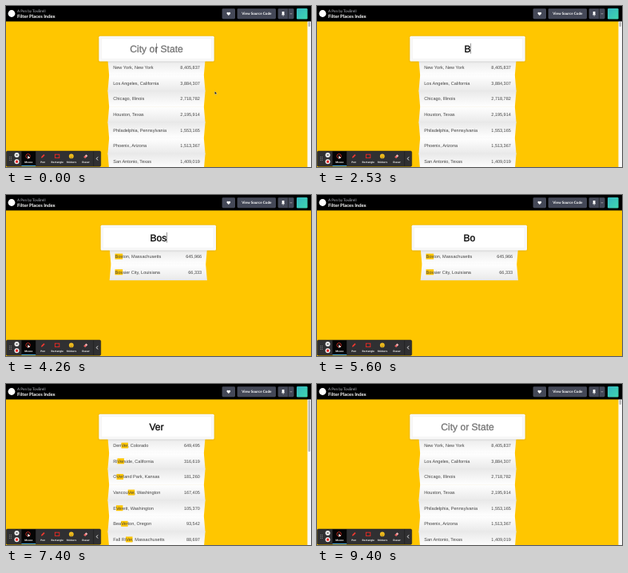
Recreate the animation shown at these times as an HTML page. Size 382 by 202 pixels, loop 9.46 s.

```html
<!DOCTYPE html>
<html lang="en">
<head>
<meta charset="utf-8">
<title>City search</title>
<style>
html, body { margin: 0; width: 100%; height: 100%; overflow: hidden; background: #ffc600; }
svg { display: block; width: 382px; height: 202px; }
text { font-family: "Liberation Sans", Arial, sans-serif; text-rendering: geometricPrecision; }
.head text { font-family: Lato, sans-serif; }
.rows text { font-size: 5.6px; fill: #444; }
.rows .num { font-size: 5.5px; text-anchor: end; }
.tools text { font: 700 3.1px Inter, sans-serif; fill: #eee; text-anchor: middle; }
#query { font-size: 12.08px; text-anchor: middle; stroke-width: .3px; }
</style>
</head>
<body>
<svg viewBox="0 0 382 202">
  <defs>
    <linearGradient id="odd" x1="0" y1="0" x2="0" y2="1">
      <stop offset="0" stop-color="#e9e9e9"/><stop offset="1" stop-color="#fff"/>
    </linearGradient>
    <linearGradient id="even" x1="0" y1="0" x2="0" y2="1">
      <stop offset="0" stop-color="#fff"/><stop offset="1" stop-color="#e9e9e9"/>
    </linearGradient>
    <linearGradient id="face" x1="0" y1="0" x2="1" y2="1">
      <stop offset="0" stop-color="#35b5c0"/><stop offset="1" stop-color="#3fd8b0"/>
    </linearGradient>
    <filter id="soft" x="-10%" y="-20%" width="120%" height="140%"><feGaussianBlur stdDeviation=".8"/></filter>
  </defs>

  <rect width="382" height="202" fill="#ffc600"/>
  <g id="bar">
    <rect x="377.5" y="19" width="4.5" height="183" fill="#fafafa"/>
    <rect id="thumb" x="378.5" y="20" width="2.6" height="6" rx="1.3" fill="#b9b9b9"/>
  </g>

  <g id="form">
    <g class="rows" id="rows"></g>
    <rect x="116.3" y="38" width="144.4" height="32" rx="1.5" opacity=".14" filter="url(#soft)"/>
    <rect x="116.3" y="37.8" width="144.4" height="31.7" rx="1.5" fill="#f8f8f8"/>
    <rect x="119.3" y="40.9" width="138.4" height="25.6" fill="#fff" stroke="#efefef" stroke-width=".5"/>
    <text id="query" x="188.5" y="57.5"></text>
    <rect id="caret" y="46.8" width=".5" height="13" fill="#333"/>
  </g>

  <g class="head">
    <rect width="382" height="19.4"/>
    <circle cx="7" cy="9.5" r="4.4" fill="#fff"/>
    <text x="14" y="7.5" font-size="4.7" fill="#b4b6be">A Pen by TovBrell</text>
    <text x="14" y="14.6" font-size="5.9" font-weight="700" fill="#fff">Filter Places Index</text>
    <g fill="#444857">
      <rect x="270.6" y="3.2" width="16.4" height="13" rx="1.4"/>
      <rect x="289.6" y="3.2" width="48.4" height="13" rx="1.4"/>
      <rect x="340.6" y="3.2" width="20" height="13" rx="1.4"/>
    </g>
    <path d="M353.4 3.2v13" stroke="#111" stroke-width=".6"/>
    <path d="M278.8 12l-2-2.1c-1.2-1.5.8-3.2 2-1.6 1.2-1.6 3.2.1 2 1.6z" fill="#fff"/>
    <text x="313.8" y="11.4" font-size="4.6" font-weight="700" text-anchor="middle" fill="#fff">View Source Code</text>
    <path d="M345.7 7h2.8v3.2l.8 1.1h-4.4l.8-1.1zM346.8 11h.6v2h-.6z" fill="#fff"/>
    <path d="M355.8 9l1.2 1.3 1.2-1.3" fill="none" stroke="#ccc" stroke-width=".6"/>
    <rect x="364" y="3" width="13.6" height="13.4" rx="1.2" fill="url(#face)"/>
  </g>

  <g class="tools">
    <rect x=".3" y="182" width="118.4" height="19.3" rx="1.6" fill="#303032" stroke="#1c1c1c" stroke-width=".5"/>
    <g id="grip" fill="#999"></g>
    <circle cx="13.5" cy="187" r="3" fill="#f2f2f2"/>
    <path d="M12.4 185.9l2.2 2.2m0-2.2l-2.2 2.2" stroke="#222" stroke-width=".7"/>
    <circle cx="13.5" cy="195.3" r="3" fill="#f2f2f2"/>
    <rect x="12" y="193.8" width="3" height="3" rx=".5" fill="#e02020"/>
    <rect x="19.4" y="182.3" width="17.8" height="18.7" fill="#050505"/>
    <rect x="19.4" y="200" width="17.8" height="1" fill="#4aa8dc"/>
    <circle cx="27.6" cy="188.3" r="2.7" fill="none" stroke="#e8382c" stroke-width=".8"/>
    <path d="M27.4 187.6v4.4l1.1-1 1.8.1z" fill="#fff"/>
    <path d="M43.9 190.8l.5-1.7 3-3 1.2 1.2-3 3z" fill="#f03a32"/>
    <rect x="61.4" y="186.2" width="5.4" height="4.4" fill="none" stroke="#f02a24" stroke-width=".9"/>
    <circle cx="81.8" cy="188.4" r="2.9" fill="#f8c420"/>
    <path d="M80.2 189a1.7 1.5 0 0 0 3.2 0M80.8 187.2v.6m2-.6v.6" fill="none" stroke="#5a3a00" stroke-width=".5"/>
    <path d="M97.4 189.4l3-3.2 1.9 1.8-3 3.1z" fill="#f3b6b8"/>
    <path d="M97.4 189.4l1.3-1.4 1.9 1.8-1.3 1.3z" fill="#e34a4a"/>
    <text x="28.3" y="196.8">Mouse</text>
    <text x="46.2" y="196.8">Pen</text>
    <text x="64.2" y="196.8">Rectangle</text>
    <text x="82" y="196.8">Stickers</text>
    <text x="100" y="196.8">Eraser</text>
    <path d="M109.6 182.4v18.5" stroke="#1b1b1b" stroke-width=".6"/>
    <path d="M115 189.5l-1.7 2 1.7 2" fill="none" stroke="#fff" stroke-width=".9"/>
  </g>
  <path id="mouse" d="M261.4 106.9v4l.9-.8.7 1.5.7-.3-.7-1.5h1.3z" stroke="#fff" stroke-width=".35"/>
</svg>
<script>
const LOOP = 9460, ROW = 19.65, TOP = 67.2, MID = 188.5, LEFT = 134.2, SIZE = 5.6;
const $ = id => document.getElementById(id);

const lists = {
  '': ['New York, New York|8,405,837', 'Los Angeles, California|3,884,307', 'Chicago, Illinois|2,718,782',
    'Houston, Texas|2,195,914', 'Philadelphia, Pennsylvania|1,553,165', 'Phoenix, Arizona|1,513,367',
    'San Antonio, Texas|1,409,019'],
  B: ['Columbus, Ohio|822,553', 'Boston, Massachusetts|645,966', 'Baltimore, Maryland|622,104',
    'Albuquerque, New Mexico|556,495', 'Long Beach, California|469,428', 'Virginia Beach, Virginia|448,479',
    'Omaha, Nebraska|434,353'],
  Bo: ['Boston, Massachusetts|645,966', 'Greensboro, North Carolina|279,639', 'Lubbock, Texas|239,538',
    'Boise City, Idaho|214,237', 'Murfreesboro, Tennessee|117,044', 'Ann Arbor, Michigan|117,025',
    'Boulder, Colorado|103,166'],
  Bos: ['Boston, Massachusetts|645,966', 'Bossier City, Louisiana|66,333'],
  V: ['Philadelphia, Pennsylvania|1,553,165', 'Jacksonville, Florida|842,583', 'Denver, Colorado|649,495',
    'Nashville-Davidson, Tennessee|634,464', 'Louisville, Kentucky|609,893', 'Las Vegas, Nevada|603,488',
    'Virginia Beach, Virginia|448,479'],
  Ve: ['Denver, Colorado|649,495', 'Las Vegas, Nevada|603,488', 'Cleveland, Ohio|390,113',
    'Riverside, California|316,619', 'Overland Park, Kansas|181,260', 'Vancouver, Washington|167,405',
    'Ventura, California|108,817'],
  Ver: ['Denver, Colorado|649,495', 'Riverside, California|316,619', 'Overland Park, Kansas|181,260',
    'Vancouver, Washington|167,405', 'Everett, Washington|105,370', 'Beaverton, Oregon|93,542',
    'Fall River, Massachusetts|88,697']
};
const thumbs = { '': 6, B: 9, Bo: 53, Bos: 0, V: 8, Ve: 38, Ver: 65 };

// [time, value]: the list follows each key press a little later
const typed = [[0, ''], [2460, 'B'], [3000, 'Bo'], [4090, 'Bos'], [5600, 'Bo'], [5800, 'B'], [6000, ''],
  [6330, 'V'], [6560, 'Ve'], [6740, 'Ver'], [8730, 'Ve'], [8900, 'V'], [9070, '']];
const found = [[0, ''], [2590, 'B'], [3120, 'Bo'], [4200, 'Bos'], [5700, 'Bo'], [5900, 'B'], [6100, ''],
  [6430, 'V'], [6640, 'Ve'], [6840, 'Ver'], [8840, 'Ve'], [9010, 'V'], [9190, '']];
const caretOn = [[0, 360], [840, 1310], [1790, 2260], [2460, 3460], [3930, 4600], [5060, 5530],
  [5660, 7230], [7730, 8200], [8730, 9390]];

const at = (track, t) => track.filter(k => k[0] <= t).pop()[1];
const pen = document.createElement('canvas').getContext('2d');
pen.font = '100px "Liberation Sans", Arial, sans-serif';
const width = (s, size) => pen.measureText(s).width * size / 100;

// Rows tilt alternately, so each is wider at the top or at the bottom; they overlap to hide seams
function row(item, i, key) {
  const [place, count] = item.split('|');
  const y = TOP + ROW * i, end = y + ROW + .5, base = y + 11.9;
  const [a, b] = i % 2 ? [59.3, 61.1] : [61.1, 59.3];
  const edge = `${MID - a},${y} ${MID + a},${y} ${MID + b},${end} ${MID - b},${end}`;
  let name = place, marks = '';
  if (key) {
    const hit = new RegExp(key, 'gi');
    name = place.replace(hit, key);
    for (const m of name.matchAll(hit)) {
      const x = LEFT + width(name.slice(0, m.index), SIZE);
      marks += `<rect x="${x}" y="${base - 5.5}" width="${width(key, SIZE)}" height="7" fill="#ffc600"/>`;
    }
  }
  return `<polygon points="${edge}" fill="url(#${i % 2 ? 'even' : 'odd'})"/>
    <path d="M${MID - b} ${end - .2}h${2 * b}" stroke="#dcdcdc" stroke-width=".4"/>${marks}
    <text x="${LEFT}" y="${base}">${name}</text>
    <text class="num" x="242.8" y="${base - .1}">${count}</text>`;
}

let shown = null;
function showList(key) {
  if (key === shown) return;
  shown = key;
  $('rows').innerHTML = lists[key].map((item, i) => row(item, i, key)).join('');
  const size = thumbs[key];
  $('bar').setAttribute('visibility', size ? 'visible' : 'hidden');
  $('thumb').setAttribute('height', size);
  $('form').setAttribute('transform', `translate(${size ? 0 : 2.3} 0)`);
}

function draw(t) {
  const text = at(typed, t), ink = text ? '#000' : '#757575';
  showList(at(found, t));
  $('query').textContent = text || 'City or State';
  $('query').setAttribute('fill', ink);
  $('query').setAttribute('stroke', ink);
  $('caret').setAttribute('x', MID + width(text, 12.08) / 2);
  $('caret').setAttribute('visibility', caretOn.some(([a, b]) => t >= a && t < b) ? 'visible' : 'hidden');
  $('mouse').setAttribute('visibility', t < 2460 ? 'visible' : 'hidden');
}

for (let i = 0; i < 6; i++)
  $('grip').innerHTML += `<circle cx="${4.6 + i % 2 * 1.8}" cy="${189.4 + (i >> 1) * 2}" r=".5"/>`;

const start = performance.now();
function tick() {
  draw((performance.now() - start) % LOOP);
  requestAnimationFrame(tick);
}
tick();
</script>
</body>
</html>
```
